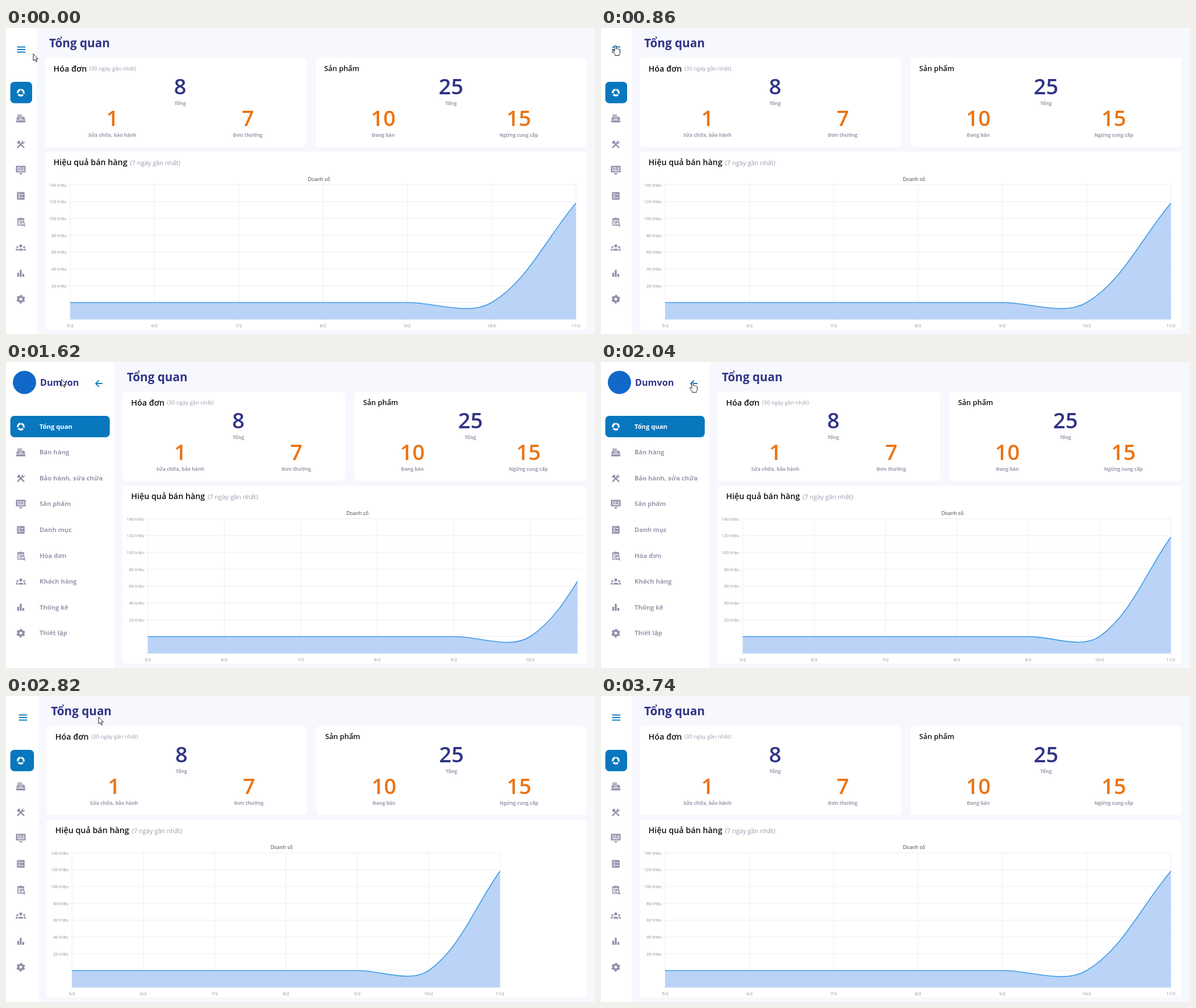
Recreate the animation shown at these times as an HTML page. Size 1037 by 540 pixels, loop 3760 ms.

```html
<!DOCTYPE html>
<html lang="vi">
<head>
<meta charset="utf-8">
<title>Tổng quan</title>
<style>
html, body { margin: 0; width: 100%; height: 100%; overflow: hidden; background: #f7f8fd; }
svg { display: block; font-family: "Open Sans", "Noto Sans", sans-serif; }
</style>
</head>
<body>
<svg id="stage" width="1037" height="540" viewBox="0 0 1037 540">
  <defs>
    <clipPath id="logoClip"><rect id="logoBox" height="90"/></clipPath>
    <clipPath id="nameClip"><rect id="nameBox" height="90"/></clipPath>
    <clipPath id="menuClip"><rect id="menuBox" y="90" height="450"/></clipPath>
    <clipPath id="cardClip"><rect y="218" width="1014" height="314"/></clipPath>
    <clipPath id="areaClip"><rect id="areaBox" y="260" height="260"/></clipPath>
  </defs>
  <rect width="1037" height="540" fill="#f7f8fd"/>
  <g fill="#fff">
    <rect id="side" height="540"/>
    <rect id="cardA" y="53" height="157" rx="6"/>
    <rect id="cardB" y="53" height="157" rx="6"/>
    <rect id="cardC" y="218" height="314" rx="6"/>
  </g>
  <g id="heads"></g>
  <g id="colA"></g>
  <g id="colB"></g>
  <g clip-path="url(#cardClip)">
    <path id="grid" fill="none" stroke="#eeeef0"/>
    <g id="axis"></g>
    <g clip-path="url(#areaClip)">
      <path id="fill" fill="#bad3f7"/>
      <path id="line" fill="none" stroke="#3c9be6" stroke-width="1.6"/>
    </g>
  </g>
  <g clip-path="url(#logoClip)"><circle cx="32.5" cy="36" r="20.5" fill="#1268c8"/></g>
  <g id="brand" clip-path="url(#nameClip)"></g>
  <g id="toggle" fill="none" stroke="#137cc1" stroke-width="1.8">
    <path id="bars" d="M-7.3-4.5h14.6M-7.3 0h14.6M-7.3 4.5h14.6"/>
    <path id="back" d="M6.3 0h-12M.3-5.8L-5.5 0 .3 5.8"/>
  </g>
  <rect id="active" x="7.6" y="95" height="37.8" rx="7" fill="#0877be"/>
  <g id="menu" clip-path="url(#menuClip)"></g>
  <g id="cursor" fill="#fff" stroke="#222" stroke-linejoin="round">
    <path id="arrow" d="M0 0v12.2l2.8-2.6 2 4.6 1.9-.8-2-4.5h3.8z"/>
    <path id="hand" d="M-1.4 9V1.3a1.4 1.4 0 0 1 2.8 0V6q1.4-1 2.4.4 1.3-.8 2.3.5 1.5-.5 1.9 1v4.3q0 2-1.4 3.6v2H-.6v-1.8L-4.8 10.5q-.5-2 1.3-1.7l2.1 1.7z"/>
  </g>
</svg>
<script>
const $ = id => document.getElementById(id);
const set = (id, attrs) => { for (const k in attrs) $(id).setAttribute(k, attrs[k]); };
const NAVY = '#303485', ORANGE = '#ec7413', GREY = '#9a9aae', ICON = '#9090aa';

function text(parent, str, x, y, size, fill, weight = 400, anchor = 'start') {
  const el = document.createElementNS('http://www.w3.org/2000/svg', 'text');
  Object.entries({ x, y, fill, 'font-size': size, 'font-weight': weight, 'text-anchor': anchor })
    .forEach(([k, v]) => el.setAttribute(k, v));
  el.textContent = str;
  $(parent).append(el);
  return el;
}

// Headings that slide with the sidebar
text('heads', 'Tổng quan', 76, 34, 20.7, NAVY, 700);
text('heads', 'Hóa đơn', 83.5, 77, 14.3, '#111', 600);
text('heads', '(30 ngày gần nhất)', 147, 75.3, 9.55, GREY);
text('heads', 'Hiệu quả bán hàng', 83.5, 242, 14.3, '#111', 600);
text('heads', '(7 ngày gần nhất)', 218.5, 242, 11, GREY);

// Summary columns: a total above two parts, placed at fractions of the column
function column(id, parts) {
  return parts.map(([value, label, at], i) => {
    const y = i ? 173 : 117;
    return [at, text(id, value, 0, y, 38, i ? ORANGE : NAVY, 600, 'middle'),
      text(id, label, 0, y + 18.8, 8.5, GREY, 700, 'middle')];
  });
}
const columnA = column('colA', [['8', 'Tổng', .5], ['1', 'Sửa chữa, bảo hành', .25], ['7', 'Đơn thường', .75]]);
const columnB = column('colB', [['25', 'Tổng', .5], ['10', 'Đang bán', .25], ['15', 'Ngừng cung cấp', .75]]);
const headB = text('colB', 'Sản phẩm', 0, 76, 12.8, '#111', 600);

// Chart labels
const ROW = 29.68, TOP = 276.7, BASE = TOP + 8 * ROW;
const yLabels = [...Array(7).keys()].map(i =>
  text('axis', `${140 - i * 20} triệu`, 0, TOP + i * ROW + 2.8, 7.45, '#8c8c94', 400, 'end'));
const xLabels = [...Array(7).keys()].map(i =>
  text('axis', `${5 + i}/2`, 0, 527.8, 7.6, '#8c8c94', 400, 'middle'));
const legend = text('axis', 'Doanh số', 0, 269.5, 8.75, '#444', 500, 'middle');

// Sidebar
const brand = text('brand', 'Dumvon', 0, 42, 16.2, NAVY, 700);
const items = [
  ['Tổng quan', '<circle r="5.2" fill="none" stroke="#fff" stroke-width="3.3" stroke-dasharray="9 1.89" transform="rotate(-80)"/>'],
  ['Bán hàng', '<path fill-rule="evenodd" d="M-8 3.5h16v3.5h-16zM-6-3h12l2 5.5h-16zM-5.5-7h7v3.2h-7zM-4-1.5h2v1h-2zM-1-1.5h2v1h-2zM2-1.5h2v1h-2zM-3 .6h6v1h-6zM-4-6h4v1h-4z"/>'],
  ['Bảo hành, sửa chữa', `<path d="M-6 6.3L3-2.7M6 6.3L-4-3.7" fill="none" stroke="${ICON}" stroke-width="2.4"/><path d="M-7-3l4-4 2.500 2.500-4 4zM2-1.500A3.600 3.600 0 0 1 5-7L3.600-4.600 5-3.200 7.300-5A3.600 3.600 0 0 1 2-1.500z"/>`],
  ['Sản phẩm', '<path fill-rule="evenodd" d="M-7.5-7.5h15q1 0 1 1v9.5q0 1-1 1h-15q-1 0-1-1v-9.5q0-1 1-1zM-6-5v4h7v-4zM3-5v1.5h3.5v-1.5zM3-2.5v1.5h3.5v-1.5zM-6 .3v1.5h12.5v-1.5zM-5-4h5v2h-5zM-4 5.5h8l-4 2.8z"/>'],
  ['Danh mục', '<path fill-rule="evenodd" d="M-5.5-6.7h11q1.2 0 1.2 1.2v11q0 1.2-1.2 1.2h-11q-1.2 0-1.2-1.2v-11q0-1.2 1.2-1.2zM-4.5-4.5v3.7h3.7v-3.7zM-4.5.8v3.7h3.7v-3.7zM.8-3.4v1.5h3.7v-1.5zM.8 1.9v1.5h3.7v-1.5zM-3.7-3.7h2.1v2.1h-2.1zM-3.7 1.6h2.1v2.1h-2.1z"/>'],
  ['Hóa đơn', `<path fill-rule="evenodd" d="M-6-6h4q2-3 4 0h4v6.5h-1.5v-3.5h-9v8.5h4.5v1.5h-6zM-3.5-1.5h7v1.3h-7zM-3.5 1.3h3.5v1.3h-3.5z"/><circle cx="3.2" cy="3.6" r="2.9" fill="#fff" stroke="${ICON}" stroke-width="1.6"/><path d="M5.2 5.6l2.5 2.5" stroke="${ICON}" stroke-width="1.8"/>`],
  ['Khách hàng', '<circle cy="-2.8" r="2.7"/><circle cx="-6" cy="-.6" r="1.8"/><circle cx="6" cy="-.6" r="1.8"/><path d="M-4.7 5.3V3.8q4.7-4 9.4 0v1.5zM-9 5.3V3.5q1.5-2 4-1.5-1.2 1.3-1 3.3zM9 5.3V3.5q-1.5-2-4-1.5 1.2 1.3 1 3.3z"/>'],
  ['Thống kê', '<path d="M-6.2-1h3.3v7h-3.3zM-1.7-6.3h3.3v12.3h-3.3zM2.8 1h3.3v5h-3.3z"/>'],
  ['Thiết lập', `<g fill="none" stroke="${ICON}"><circle r="4.3" stroke-width="3.6"/><circle r="6.5" stroke-width="2.2" stroke-dasharray="3.7 3.107" transform="rotate(14)"/></g>`]
];
items.forEach(([label, icon], i) => {
  const y = 114 + i * 45.57;
  $('menu').insertAdjacentHTML('beforeend', `<g fill="${ICON}" transform="translate(26 ${y})">${icon}</g>`);
  text('menu', label, 59, y + 3.7, 11.2, i ? GREY : '#fff', 700);
});

// Timing
const LOOP = 3760, OPEN = 872, CLOSE = 2419;

function ease(x) {
  if (x <= 0) return 0;
  if (x >= 1) return 1;
  let lo = 0, hi = 1;
  const bez = (u, a, b) => 3 * a * u * (1 - u) ** 2 + 3 * b * u * u * (1 - u) + u ** 3;
  for (let i = 0; i < 20; i++) {
    const mid = (lo + hi) / 2;
    if (bez(mid, .25, .25) < x) lo = mid; else hi = mid;
  }
  return bez(lo, .1, 1);
}

// Linear interpolation over [time, value] stops
function track(stops, t) {
  let i = 1;
  while (i < stops.length - 1 && stops[i][0] < t) i++;
  const [t0, a] = stops[i - 1], [t1, b] = stops[i];
  return a + (b - a) * Math.min(1, Math.max(0, (t - t0) / (t1 - t0)));
}
const PLOT = [[900, 890.4], [1140, 877], [1620, 808], [1950, 753.6], [2900, 753.6],
  [3180, 839.4], [3220, 852], [3340, 880], [3460, 890.4]];
const CENTRE = [[930, 475], [1140, 434], [1450, 406], [2890, 406], [3180, 451.5], [3330, 472], [3420, 475]];
const MOUSE_X = [[0, 48], [80, 47], [360, 27], [500, 25.5], [900, 25.5], [1140, 24.5], [1250, 30],
  [1620, 97.5], [1950, 160], [2150, 163], [3260, 163], [3640, 91]];
const MOUSE_Y = [[0, 45.5], [80, 44], [360, 26], [500, 31], [1140, 30.5], [1620, 30.5], [1950, 35],
  [2150, 37], [3260, 37], [3640, 560]];

function drawChart(t, left) {
  const width = track(PLOT, t), half = track(CENTRE, t), step = width / 6;
  const right = left + width, zero = TOP + 7 * ROW, peak = 309;
  const xs = xLabels.map((_, i) => left + i * step);
  let grid = '';
  for (let i = 0; i < 9; i++) grid += `M${left - 4} ${TOP + i * ROW}H${right}`;
  xs.forEach((x, i) => {
    grid += `M${x} 274V${BASE + 3}`;
    xLabels[i].setAttribute('x', x);
  });
  yLabels.forEach(l => l.setAttribute('x', left - 6.3));
  legend.setAttribute('x', left - 37 + half);

  // Cardinal spline whose handles follow the neighbouring segment lengths
  const k = .35, rise = zero - peak, long = Math.hypot(step, rise);
  const before = k * step / (step + long), after = k - before;
  const curve = `M${left} ${zero}H${xs[4]}` +
    `C${xs[4] + k * step} ${zero} ${xs[5] - before * 2 * step} ${zero + before * rise} ${xs[5]} ${zero}` +
    `C${xs[5] + after * 2 * step} ${zero - after * rise} ${right - k * step} ${peak + k * rise} ${right} ${peak}`;
  set('grid', { d: grid });
  set('line', { d: curve });
  set('fill', { d: `${curve}V${BASE}H${left}Z` });
  set('areaBox', { x: left - 1, width: 2 * half - 54.5 });
}

function draw(t) {
  const shift = 136.7 * (ease((t - OPEN) / 500) - ease((t - CLOSE) / 500));
  const side = 54 + shift, edge = 68 + shift, half = (1022 - edge) / 2, mid = edge + half;

  set('side', { width: side });
  set('cardA', { x: edge, width: half - 16.5 });
  set('cardB', { x: mid, width: half });
  set('cardC', { x: edge, width: 2 * half });
  set('heads', { transform: `translate(${shift})` });
  for (const [cells, x0] of [[columnA, edge], [columnB, mid]])
    for (const [at, ...labels] of cells)
      labels.forEach(l => l.setAttribute('x', x0 + at * half));
  headB.setAttribute('x', mid + 15.3);
  drawChart(t, 113 + shift);

  const nameX = 60 - (190.7 - side) * .4;
  brand.setAttribute('x', nameX);
  set('logoBox', { width: Math.max(0, nameX - 4) });
  set('nameBox', { width: Math.max(0, side - 57) });
  set('menuBox', { width: side - 8 });
  set('active', { width: side - 15.6 });

  const open = t >= OPEN && t < CLOSE;
  set('toggle', { transform: `translate(${side - 27.2} 38)` });
  set('bars', { visibility: open ? 'hidden' : 'visible' });
  set('back', { visibility: open ? 'visible' : 'hidden' });

  const x = track(MOUSE_X, t), y = track(MOUSE_Y, t);
  const over = Math.abs(x - side + 27) < 14 && Math.abs(y - 38) < 14;
  set('cursor', { transform: `translate(${x} ${y})` });
  set('arrow', { visibility: over ? 'hidden' : 'visible' });
  set('hand', { visibility: over ? 'visible' : 'hidden' });
}

const start = performance.now();
function frame() {
  draw((performance.now() - start) % LOOP);
  requestAnimationFrame(frame);
}
frame();
</script>
</body>
</html>
```
